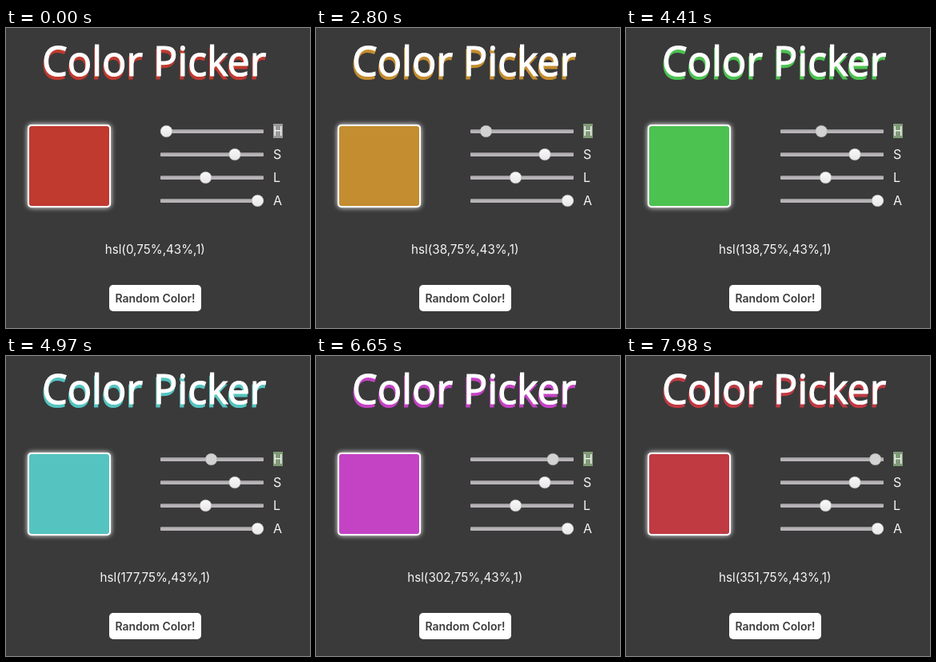
Recreate the animation shown at these times as an HTML page. Size 380 px wide and 376 px high, loop 8000 ms.

```html
<!DOCTYPE html>
<html lang="en">
<head>
<meta charset="utf-8">
<title>Color Picker</title>
<style>
  html, body { margin: 0; width: 100%; height: 100%; overflow: hidden; background: #3a3a3a; }
  svg { display: block; width: 380px; height: 376px; font: 16px Inter, Roboto, sans-serif; fill: #f5f5f5; }
  .title { font: 400 50.4px "Open Sans", "Noto Sans", sans-serif; stroke-width: 1.2; }
  .face { fill: #fff; stroke: #fff; }
  .swatch { stroke: #fff; stroke-width: 2; }
  .glow { fill: #fff; filter: drop-shadow(0 0 3px #fff); }
  .value { font-size: 15.2px; text-anchor: middle; }
  .button { font-size: 14px; font-weight: 600; text-anchor: middle; fill: #3b3b3b; }
</style>
</head>
<body>
<svg viewBox="0 0 380 376">
  <defs>
    <linearGradient id="track" x2="0" y2="1">
      <stop offset="0" stop-color="#8f8c8f"/>
      <stop offset=".45" stop-color="#bbb7bb"/>
      <stop offset="1" stop-color="#b3afb3"/>
    </linearGradient>
    <linearGradient id="knob" x2="0" y2="1">
      <stop offset="0" stop-color="#fafafa"/>
      <stop offset="1" stop-color="#e6e6e6"/>
    </linearGradient>
  </defs>
  <text class="title" id="shadow" x="44" y="64">Color Picker</text>
  <text class="title face" x="45" y="60">Color Picker</text>
  <rect class="glow" x="27" y="121" width="104" height="104" rx="5"/>
  <rect class="swatch" id="swatch" x="28" y="122" width="102" height="102" rx="4"/>
  <rect id="highlight" x="334" y="120" width="12" height="18"/>
  <g id="sliders"></g>
  <text class="value" id="value" x="186.3" y="283"></text>
  <rect x="129" y="322" width="115" height="33" rx="5" fill="#fff"/>
  <text class="button" x="186.5" y="344">Random Color!</text>
</svg>
<script>
const LOOP = 8000, STEP = 70, FOCUS = 910, PRESS = 1890;
const hueKeys = [[2100, 0], [3500, 75], [4970, 177], [5810, 261], [6650, 302], [7980, 351]];
const byId = id => document.getElementById(id);
const knobX = fraction => 200.5 + 114 * fraction;

byId('sliders').innerHTML = [['H', 0], ['S', .75], ['L', .43], ['A', 1]].map(([label, fraction], i) => {
  const y = 129.5 + 29 * i;
  return `<rect x="193" y="${y - 2.5}" width="129" height="5" rx="1" fill="url(#track)"/>
    <circle id="knob${label}" cx="${knobX(fraction)}" cy="${y}" r="7.3" fill="url(#knob)" stroke="#a8a8a8" stroke-width=".6"/>
    <text x="334" y="${y + 5.5}">${label}</text>`;
}).join('');

function hueAt(time) {
  if (time <= hueKeys[0][0]) return 0;
  const next = hueKeys.findIndex(([t]) => t >= time);
  const [t0, h0] = hueKeys[next - 1], [t1, h1] = hueKeys[next];
  return Math.round(h0 + (h1 - h0) * (time - t0) / (t1 - t0));
}

// hsl(hue, 75%, 43%) as seen on a display with a slightly narrower gamut
function displayColor(hue) {
  const channel = n => {
    const k = (n + hue / 30) % 12;
    return .43 - .3225 * Math.max(-1, Math.min(k - 3, 9 - k, 1));
  };
  const [r, g, b] = [0, 8, 4].map(n => ((channel(n) + .055) / 1.055) ** 2.4);
  const mixed = [r + .108 * g + .047 * b, .057 * r + 1.025 * g + .03 * b, .033 * r + 1.1 * b];
  return `rgb(${mixed.map(v => Math.round(255 * (1.055 * v ** (1 / 2.4) - .055)))})`;
}

function draw(now) {
  const time = Math.floor(now % LOOP / STEP) * STEP;
  const hue = hueAt(time), color = displayColor(hue);
  byId('swatch').style.fill = color;
  byId('shadow').style.fill = byId('shadow').style.stroke = color;
  byId('highlight').style.fill = time < FOCUS ? '#989898' : '#7f9a76';
  byId('knobH').setAttribute('cx', knobX(hue / 360));
  byId('knobH').style.fill = time < PRESS ? '' : '#d2d2d2';
  byId('value').textContent = `hsl(${hue},75%,43%,1)`;
}

const start = performance.now();
function tick() {
  draw(performance.now() - start);
  requestAnimationFrame(tick);
}
tick();
</script>
</body>
</html>
```
